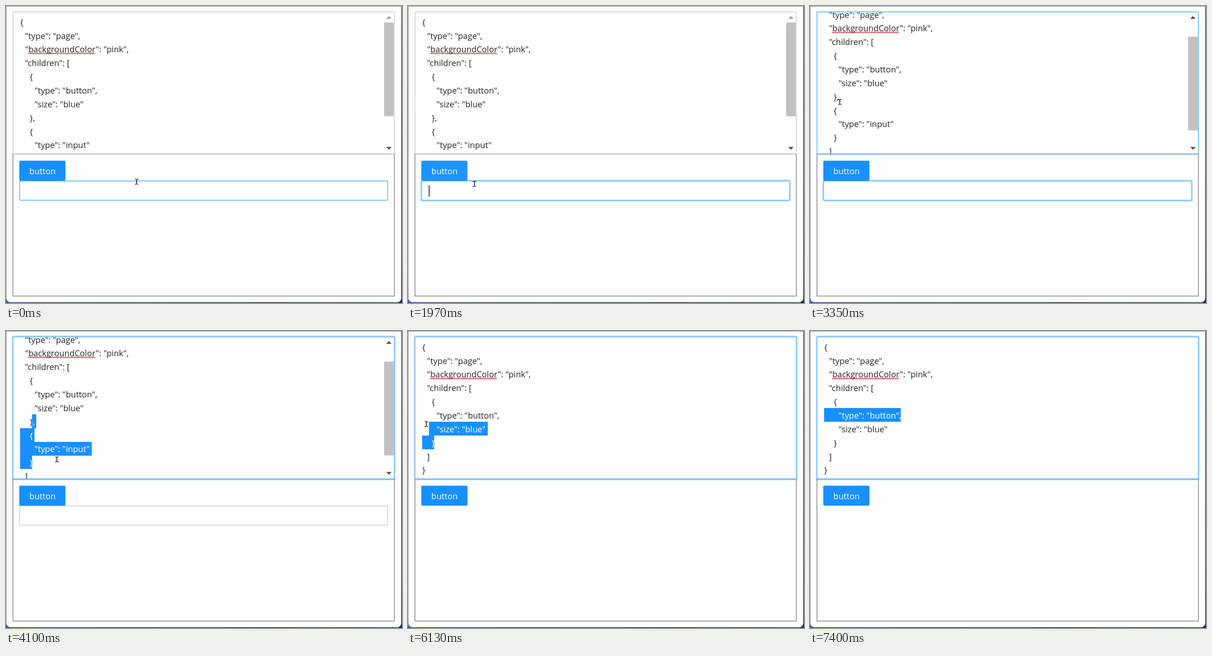
These frames come from a looping animation (864x648 px, 8000 ms). An HTML page with a canvas:

```html
<!DOCTYPE html>
<html lang="en">
<head>
<meta charset="utf-8">
<title>JSON page editor</title>
<style>
html, body { margin: 0; width: 100%; height: 100%; overflow: hidden; background: #fefefe; }
canvas { display: block; }
</style>
</head>
<body>
<canvas id="stage" width="864" height="648"></canvas>
<script>
const ctx = document.getElementById('stage').getContext('2d');
const LOOP = 8000, STEP = 120, LINE = 29.86, TOP = 18.9, LEFT = 31, INDENT = 10.4;
const DELETED = 4940;
const FONT = '18.2px "Open Sans", "Noto Sans", sans-serif';
const INK = '#262626', BLUE = [24, 144, 255], LIGHT = [64, 169, 255];

// Screen updates come in runs: [first time, number of steps]
const ticks = [
  [0, 1], [590, 1], [740, 5], [1370, 6], [2120, 2], [2390, 7], [3230, 4], [3740, 4], [4940, 1],
  [5440, 1], [5590, 2], [5860, 2], [6130, 2], [6400, 1], [6770, 3], [7160, 3]
].flatMap(([start, n]) => Array.from({ length: n }, (_, i) => start + i * STEP));

// Pointer path: [time, x, y]
const path = [
  [0, 285, 383], [590, 262, 388], [740, 200, 398], [980, 170, 395], [1220, 105, 358],
  [1490, 105, 359], [1610, 107, 366], [1970, 145, 388], [2240, 130, 300], [3110, 66, 211],
  [3350, 65, 209], [3590, 62, 206], [3740, 61, 200], [4100, 111, 280], [5590, 111, 279],
  [5710, 92, 248], [5980, 61, 243], [6130, 40, 203], [6250, 8, 172], [6400, 4, 149],
  [6770, 20, 165], [7010, 197, 183], [7160, 211, 183]
];

// Selected spans: [line, from x, to x]
const comma = [7, 57, 66], brace = [8, LEFT, 62], size = [6, LEFT, 174], end = [7, LEFT, 57];
const button = [5, LEFT, 204];
const selections = [
  [0, []],
  [3860, [comma, [8, LEFT, 57]]],
  [3980, [comma, brace, [9, LEFT, 94]]],
  [4100, [comma, brace, [9, LEFT, 187], [10, LEFT, 57]]],
  [DELETED, []],
  [6130, [[6, 46, 174], end]],
  [6250, [button, size, end]],
  [6400, [[4, LEFT, 62], button, size, end]],
  [6770, []],
  [7400, [[5, LEFT, 198]]]
];

const head = [
  [0, '{'], [1, '"type": "page",'], [1, '"backgroundColor": "pink",'], [1, '"children": ['],
  [2, '{'], [3, '"type": "button",'], [3, '"size": "blue"']
];
const tail = [[1, ']'], [0, '}']];
const longText = [...head, [2, '},'], [2, '{'], [3, '"type": "input"'], [2, '}'], ...tail];
const shortText = [...head, [2, '}'], ...tail];

const ramp = (t, a, b) => Math.min(1, Math.max(0, (t - a) / (b - a)));
const within = (t, a, b) => t >= a && t < b;
const mix = (a, b, k) => `rgb(${a.map((v, i) => Math.round(v + (b[i] - v) * k))})`;
const lastBefore = (list, t) => list.filter(item => item[0] <= t).pop();

function pointAt(t) {
  const i = path.findIndex(p => p[0] > t);
  if (i < 0) return path[path.length - 1].slice(1);
  const a = path[i - 1], b = path[i], k = ramp(t, a[0], b[0]);
  return [a[1] + (b[1] - a[1]) * k, a[2] + (b[2] - a[2]) * k];
}

function rect(x, y, w, h, color) {
  ctx.fillStyle = color;
  ctx.fillRect(x, y, w, h);
}

function rounded(x, y, w, h, r) {
  ctx.beginPath();
  ctx.roundRect(x, y, w, h, r);
}

function ring(x, y, w, h, spread, alpha) {
  if (spread <= 0 || alpha <= 0) return;
  rounded(x - spread, y - spread, w + 2 * spread, h + 2 * spread, 2 + spread);
  ctx.roundRect(x, y, w, h, 2);
  ctx.fillStyle = `rgba(${BLUE},${alpha})`;
  ctx.fill('evenodd');
}

function field(x, y, w, h, blue, focus) {
  ring(x, y, w, h, 2.7, 0.2 * focus);
  rounded(x + 0.7, y + 0.7, w - 1.4, h - 1.4, 2);
  ctx.lineWidth = 1.4;
  ctx.strokeStyle = mix([200, 200, 200], LIGHT, blue);
  ctx.stroke();
}

function gradient(x, y, ...colors) {
  const g = ctx.createLinearGradient(0, 0, x, y);
  colors.forEach((c, i) => g.addColorStop(i / (colors.length - 1), c));
  return g;
}

function drawWindow() {
  rect(0, 0, 864, 648, gradient(0, 648, '#6b6f78', '#4a6288', '#24508f', '#1b2d62'));
  rect(0, 638, 858, 10, gradient(864, 0, '#2c62b4', '#1f3c74', '#1c2d5c', '#31488c'));
  rounded(0.5, 0.5, 862, 646, [0, 0, 9, 9]);
  ctx.fillStyle = '#fefefe';
  ctx.fill();
  ctx.lineWidth = 1;
  ctx.strokeStyle = '#777';
  ctx.stroke();
  ctx.lineWidth = 1.4;
  ctx.strokeStyle = '#747474';
  ctx.strokeRect(15.2, 323, 832.2, 309.8);
}

function drawLines(lines, color) {
  ctx.fillStyle = color;
  lines.forEach(([level, text], i) => ctx.fillText(text, LEFT + level * INDENT, TOP + 22.8 + i * LINE));
}

function drawSquiggle() {
  ctx.beginPath();
  for (let x = 48, i = 0; x <= 195; x += 2, i++) ctx.lineTo(x, 103.6 + (i % 2 ? -1.1 : 1.1));
  ctx.lineWidth = 1.2;
  ctx.strokeStyle = '#e8202a';
  ctx.stroke();
}

function triangle(y, dir, color) {
  ctx.beginPath();
  ctx.moveTo(829.5, y + 3 * dir);
  ctx.lineTo(841.5, y + 3 * dir);
  ctx.lineTo(835.5, y - 3 * dir);
  ctx.fillStyle = color;
  ctx.fill();
}

function drawEditor(t) {
  const lines = t < DELETED ? longText : shortText;
  const scroll = t < DELETED ? 46 * ramp(t, 2390, 2990) : 0;
  ctx.save();
  ctx.beginPath();
  ctx.rect(16, 13.5, 831, 308.5);
  ctx.clip();
  ctx.translate(0, -scroll);
  drawLines(lines, INK);
  drawSquiggle();
  for (const [line, x0, x1] of lastBefore(selections, t)[1]) {
    const y0 = Math.round(TOP + line * LINE - scroll) + scroll;
    const y1 = Math.round(TOP + (line + 1) * LINE - scroll) + scroll;
    ctx.save();
    ctx.beginPath();
    ctx.rect(x0 - 0.5, y0, x1 - x0 + 0.5, y1 - y0);
    ctx.clip();
    rect(x0 - 0.5, y0, x1 - x0 + 0.5, y1 - y0, '#1890ff');
    drawLines(lines, '#fff');
    ctx.restore();
  }
  if (within(t, 3740, 3860) || within(t, DELETED, 5440) || within(t, 5980, 6130))
    rect(56.5, TOP + 7 * LINE + 2, 1.4, 25, '#000');
  if (within(t, 7160, 7400)) rect(198.5, TOP + 5 * LINE + 2, 1.4, 25, '#000');
  ctx.restore();

  if (t < DELETED) {
    triangle(25, 1, scroll ? '#505050' : '#a3a3a3');
    triangle(310.5, -1, '#505050');
    rect(825, 36 + scroll * 0.67, 21, 204.5, '#c1c1c1');
  }
  field(14.5, 12, 833.5, 311.7, ramp(t, 2050, 2300), ramp(t, 3700, 3980));
}

function drawPreview(t) {
  const hover = ramp(t, 1130, 1430) - ramp(t, 1800, 2000);
  const wave = t >= 1370 ? ramp(t, 1300, 1950) : 0;
  ring(29, 337.6, 100.7, 43.4, 6 * (1 - (1 - wave) ** 2), 0.2 * (1 - wave));
  rounded(29, 337.6, 100.7, 43.4, 2.5);
  ctx.fillStyle = mix(BLUE, LIGHT, hover);
  ctx.fill();
  ctx.fillStyle = '#fff';
  ctx.fillText('button', 51, 366.7);
  if (t >= DELETED) return;
  const focus = ramp(t, 640, 940) - ramp(t, 1340, 1600) + ramp(t, 1800, 1970) - ramp(t, 3700, 3980);
  field(29, 381, 804.3, 43.4, t < 1000 ? 1 : focus, focus);
  if (within(t, 690, 1190) || within(t, 1820, 2320) || within(t, 2820, 3320))
    rect(45.4, 391, 1.5, 25, '#000');
}

function drawBeam(x, y) {
  x = Math.round(x);
  y = Math.round(y);
  rect(x - 0.7, y - 5, 1.5, 10, '#000');
  for (const dy of [-6, 5]) {
    rect(x - 3.5, y + dy, 3, 1.4, '#000');
    rect(x + 0.7, y + dy, 3, 1.4, '#000');
  }
}

function drawHand(x, y) {
  ctx.save();
  ctx.translate(x, y);
  ctx.fill(new Path2D());
  const hand = new Path2D('M-3-6q1.2-1.4 2.2 0v4.2q1-.8 2 .2q1-.6 2 .4q1.4-.4 1.8 1v4l-1.4 3.8h-5.4l-3.8-5.2q.4-1.8 2.6.2z');
  ctx.lineWidth = 1.1;
  ctx.strokeStyle = '#111';
  ctx.fillStyle = '#fff';
  ctx.fill(hand);
  ctx.stroke(hand);
  ctx.restore();
}

function drawPointer(t) {
  if (within(t, DELETED, 5590) || t >= 7400) return;
  const [x, y] = pointAt(t);
  const overButton = within(x, 29, 130) && within(y, 338, 381);
  (overButton ? drawHand : drawBeam)(x, y);
}

function frame(now) {
  const time = now % LOOP;
  const t = ticks.filter(tick => tick <= time).pop();
  ctx.font = FONT;
  drawWindow();
  drawPreview(t);
  drawEditor(t);
  drawPointer(t);
  requestAnimationFrame(frame);
}
requestAnimationFrame(frame);
</script>
</body>
</html>
```
